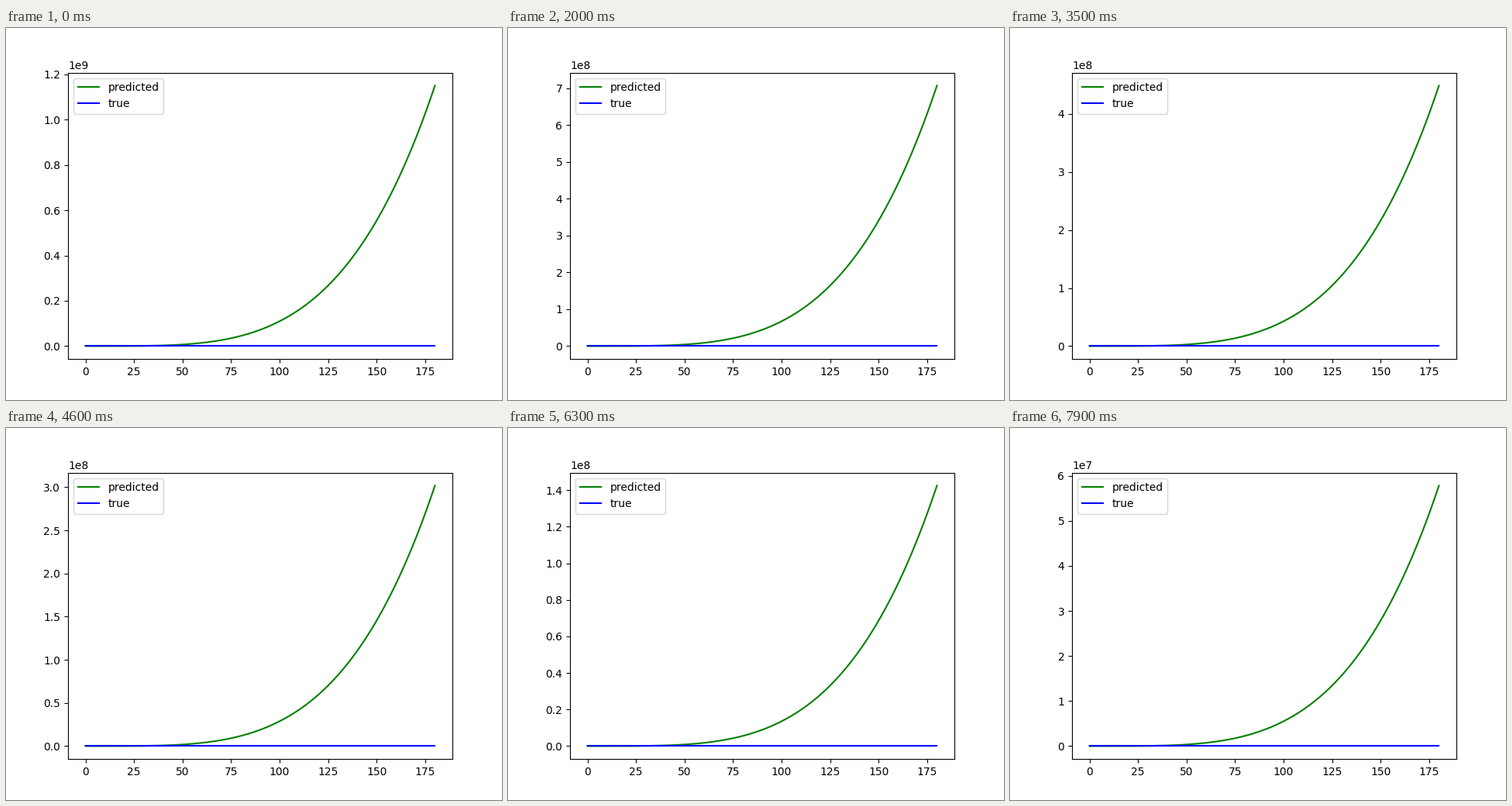
Write a matplotlib script that moves like this. It is 640 by 480 pixels and loops after 8000 ms.

```python
import numpy as np
import matplotlib.pyplot as plt
from matplotlib.animation import FuncAnimation

FRAMES = 80
INTERVAL = 100
X_MAX = 180

# The quartic's peak shrinks during training; a smooth fit of its logarithm.
STEPS = [0, 20, 35, 46, 54, 63, 79]
PEAKS = [1.150e9, 7.07e8, 4.49e8, 3.016e8, 2.17e8, 1.425e8, 5.783e7]
log_peak = np.polynomial.Polynomial.fit(STEPS, np.log(PEAKS), 4)

x = np.arange(X_MAX + 1)
shape = (x / X_MAX) ** 4

fig, ax = plt.subplots(figsize=(6.4, 4.8), dpi=100)
predicted, = ax.plot(x, shape, color="green", label="predicted")
ax.plot(x, np.sin(np.radians(x)), color="blue", label="true")
ax.set_xlim(-0.05 * X_MAX, 1.05 * X_MAX)
ax.legend(loc="upper left")


def update(step):
    peak = np.exp(log_peak(step))
    predicted.set_ydata(peak * shape)
    ax.set_ylim(-0.05 * peak, 1.05 * peak)
    return predicted,


anim = FuncAnimation(fig, update, frames=FRAMES, interval=INTERVAL,
                     init_func=lambda: update(0), repeat=True, repeat_delay=0)

plt.show()
```
